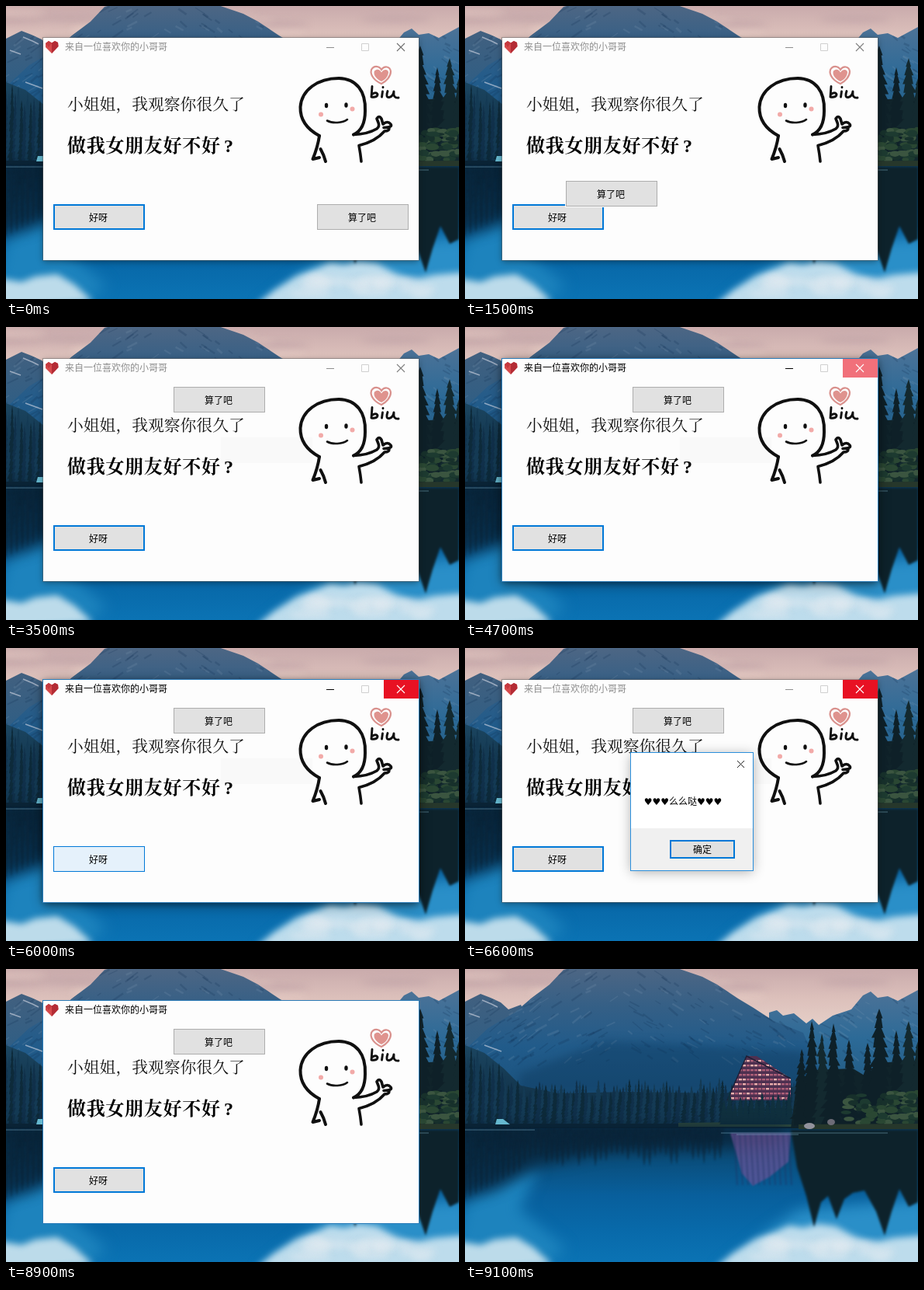
These frames come from a looping animation (584 by 377 pixels, 9.6 s). An HTML page with a canvas:

```html
<!DOCTYPE html>
<html lang="zh-CN">
<head>
<meta charset="utf-8">
<title>小窗口</title>
<style>
html, body { margin: 0; width: 100%; height: 100%; overflow: hidden; background: #0b5c9f; }
body { position: relative; font: 12px 'Noto Sans CJK SC', 'Noto Sans CJK', 'Noto Sans', sans-serif; color: #000; }
canvas, div, svg { position: absolute; box-sizing: border-box; }
canvas, svg { left: 0; top: 0; }

/* Every state change is hard; one loop is 9.6 s, so 1% = 96 ms. */
.a { animation: 9.6s step-end infinite; }

#win { left: 0; top: 0; width: 584px; height: 377px; transform-origin: 290px 184px; animation-name: leave; }
.frame { left: 48px; top: 41px; width: 484px; height: 286px; background: #fdfdfd; }
#idle { box-shadow: 0 0 0 1px rgba(90,90,90,.45), 0 2px 8px rgba(0,0,0,.38); animation-name: flat; }
#glow { box-shadow: 0 0 0 1px #2b7cb8, 0 3px 15px rgba(0,0,0,.45); animation-name: glow, flat; }
#ghost { left: 277px; top: 142px; width: 118px; height: 33px; background: #f9f9f9; animation-name: ghost; }
#bar { animation-name: ink; }
#controls { animation-name: controls; }
#red { animation-name: red; }
#x { animation-name: cross; }

.btn { width: 118px; height: 33px; display: flex; align-items: center; justify-content: center;
  padding: 0 2px 1px 0; background: #e1e1e1; border: 1px solid #adadad; outline: 1px solid #fdfdfd; }
#yes { left: 61px; top: 255px; border: 0; box-shadow: inset 0 0 0 2px #0078d7; animation-name: yes; }
#no { left: 0; top: 0; animation-name: dodge; }

#box { left: 214px; top: 135px; width: 157px; height: 151px; background: #fff; opacity: 0;
  box-shadow: 0 0 0 1px #2b8fdc, 0 2px 15px rgba(0,0,0,.32); animation-name: box; }
#foot { left: 0; bottom: 0; width: 157px; height: 54px; background: #f0f0f0; }
#ok { left: 50px; top: 112px; width: 84px; height: 24px; padding: 0; border: 0; outline: 0; box-shadow: inset 0 0 0 2px #0078d7; }
#lit { left: 0; top: 0; width: 84px; height: 24px; background: #e5f1fb; box-shadow: inset 0 0 0 1px #0078d7; animation-name: lit; }
#okText { left: 0; top: 0; width: 84px; line-height: 23px; text-align: center; }
#msg { left: 0; top: 52px; width: 134px; line-height: 20px; text-align: center; white-space: nowrap; }
#msg span { font: 12px 'DejaVu Sans', sans-serif; }

.line { font: 20.8px 'Noto Serif CJK SC', 'Noto Sans CJK SC', 'Noto Sans CJK', serif; font-weight: 300; }
.ask { font: bold 24px 'Noto Serif CJK SC', 'Noto Sans CJK SC', 'Noto Sans CJK', serif; letter-spacing: .7px; }

@keyframes dodge {
  0% { transform: translate(401px,255px); }
  7.291% { transform: translate(159px,250px); }
  11.458% { transform: translate(371px,215px); }
  15.625% { transform: translate(130px,225px); }
  18.75% { transform: translate(277px,142px); }
  22.916% { transform: translate(136px,189px); }
  27.083% { transform: translate(181px,77px); }
  32.291% { transform: translate(247px,83px); background: #e1e1e1; border-color: #adadad; }
  34.375% { transform: translate(216px,77px); background: #e5f1fb; border-color: #0078d7; }
  36.458%, 100% { transform: translate(216px,77px); background: #e1e1e1; border-color: #adadad; }
}
@keyframes ghost { 0% { opacity: 0; } 22.916% { opacity: 1; } 91.666%, 100% { opacity: 0; } }
@keyframes flat { 92.708%, 100% { box-shadow: 0 0 0 1px #2b7cb8; } }
@keyframes glow {
  0% { opacity: 0; }
  42.708% { opacity: 0; animation-timing-function: steps(5, start); }
  47.916% { opacity: 1; }
  64.583% { opacity: 1; animation-timing-function: steps(5, start); }
  69.791% { opacity: 0; }
  80.208% { opacity: .7; }
  81.25%, 100% { opacity: 1; }
}
@keyframes ink {
  0% { color: #8e8e8e; }
  42.708% { color: #000; }
  64.583% { color: #8e8e8e; }
  80.208%, 100% { color: #000; }
}
@keyframes controls { 0% { opacity: 1; } 91.666%, 100% { opacity: 0; } }
@keyframes red {
  0% { opacity: 0; fill: #e81123; }
  42.708% { opacity: .4; }
  43.75% { opacity: .8; }
  44.791% { opacity: 1; fill: #e81123; }
  48.958% { fill: #f1707a; }
  51.041% { fill: #e81123; }
  53.125% { fill: #f1707a; }
  54.166% { fill: #e81123; }
  56.25% { fill: #f1707a; }
  58.333%, 100% { opacity: 1; fill: #e81123; }
}
@keyframes cross {
  0% { stroke: #6f6f6f; }
  2.083% { stroke: #777; }
  3.125% { stroke: #7f7f7f; }
  42.708%, 100% { stroke: #fff; }
}
@keyframes yes {
  0% { background: #e1e1e1; box-shadow: inset 0 0 0 2px #0078d7; }
  62.5% { background: #e5f1fb; box-shadow: inset 0 0 0 1px #0078d7; }
  64.583%, 100% { background: #e1e1e1; box-shadow: inset 0 0 0 2px #0078d7; }
}
@keyframes box {
  0% { opacity: 0; transform: scale(.9); }
  64.583% { opacity: .25; transform: scale(.93); }
  65.625% { opacity: .65; transform: scale(.97); }
  66.666% { opacity: .88; transform: scale(.99); }
  67.708% { opacity: .97; transform: none; }
  68.75% { opacity: 1; transform: none; }
  80.208% { opacity: .45; transform: scale(.97); }
  81.25%, 100% { opacity: 0; transform: scale(.9); }
}
@keyframes lit {
  0% { opacity: 0; }
  70.833% { opacity: .35; }
  71.875% { opacity: .7; }
  72.916%, 100% { opacity: 1; }
}
@keyframes leave {
  0% { opacity: 1; transform: none; }
  93.75% { opacity: .4; transform: scale(.95); }
  94.791%, 100% { opacity: 0; transform: scale(.9); }
}
</style>
</head>
<body>
<canvas id="lake" width="584" height="377"></canvas>

<div id="win" class="a">
  <div id="idle" class="frame a"></div>
  <div id="glow" class="frame a"></div>
  <div id="ghost" class="a"></div>

  <svg width="584" height="377" fill="none">
    <g id="bar" class="a">
      <path d="M59 61L51 53 51 48 55 45 59 47.500 63 45 67 47 67.500 52Z" fill="#d64a4c"/>
      <path d="M59 47.500L63 45 67 47 67.500 52 59 61Z" fill="#b42c35"/>
      <path d="M59 47.500L55 45 51 48 55 53Z" fill="#c53a40"/>
      <text x="76" y="57.3" fill="currentColor">来自一位喜欢你的小哥哥</text>
      <g id="controls" class="a">
        <path d="M413 53.5h10" stroke="currentColor"/>
        <path d="M458.5 48.5h9v9h-9z" stroke="#d0d0d0"/>
        <path id="red" class="a" d="M487 41h45v24h-45z"/>
        <path id="x" class="a" d="M504 48l10 10m0-10l-10 10" stroke-width="1.1"/>
      </g>
    </g>

    <text class="line" x="79" y="134.3" fill="#111">小姐姐，我观察你很久了</text>
    <text class="ask" y="188" fill="#000"><tspan x="79">做我女朋友好不好</tspan><tspan x="281" font-family="Liberation Serif, serif">?</tspan></text>

    <g stroke="#101010" stroke-width="4" stroke-linecap="round" stroke-linejoin="round">
      <path d="M404 167C389 159 379 148 379.500 130C381 108 402 93 429 93C452 93.500 464 110 463 135C463 151 458 161 448 165.500"/>
      <path d="M404 167Q402 181 395.500 197L404 195M405.500 184Q410 192 412 200"/>
      <path d="M448 165.500Q466 165 478 158Q482 155 480 150L478 145Q481 140 484 145L486 152Q492 147 496 152Q499 156 487 156.500M494 157Q494 161 488 161Q477 174 455 179.500Q457 190 458 200" stroke-width="3.600"/>
      <path d="M414 147.500C421 151.500 434 150.500 440 146" stroke-width="2.600"/>
      <path d="M472 103.500L471 117Q479 118 479 113.500Q477 110 472 113.500M485.500 110L484.500 117M486 104.500v.2M492 109.500Q489 118 494 117.500Q499 116.500 500 110Q499 119 506 118" stroke-width="2.900"/>
    </g>
    <ellipse cx="413" cy="128" rx="2.200" ry="3.300" fill="#101010"/>
    <ellipse cx="438.500" cy="127.500" rx="2.200" ry="3.300" fill="#101010"/>
    <g fill="#f2aaa8"><circle cx="406" cy="139.500" r="3"/><circle cx="446.500" cy="132.500" r="3"/></g>
    <path d="M484 100C475 96 469 89 471 82C474 76 481 77 484 82C488 76 495 78 496 84C496 91 490 97 484 100Z" stroke="#d9918d" stroke-width="2.200"/>
    <path d="M484 97C477 94 473 88 475 83.500C479 80 482 82 484 85.500C487 81 492 81 493 85C493 90 489 95 484 97Z" fill="#df938e"/>
  </svg>

  <div id="yes" class="btn a">好呀</div>
  <div id="no" class="btn a">算了吧</div>
</div>

<div id="box" class="a">
  <svg width="157" height="30" fill="none" stroke="#222"><path d="M137 10l9 9m0-9l-9 9"/></svg>
  <div id="msg"><span>♥♥♥</span>么么哒<span>♥♥♥</span></div>
  <div id="foot"></div>
  <div id="ok" class="btn"><div id="lit" class="a"></div><div id="okText">确定</div></div>
</div>

<script>
const c = document.getElementById('lake').getContext('2d');
let seed = 11;
const rnd = (a = 0, b = 1) => {
  seed = (seed * 16807) % 2147483647;
  return a + (b - a) * seed / 2147483647;
};
const fade = (y0, y1, ...colors) => {
  const g = c.createLinearGradient(0, y0, 0, y1);
  colors.forEach((k, i) => g.addColorStop(i / (colors.length - 1), k));
  return g;
};
const poly = (pts, fill) => {
  const p = new Path2D('M' + pts + 'Z');
  c.fillStyle = fill;
  c.fill(p);
  return p;
};
const blob = (x, y, rx, ry, fill) => {
  c.fillStyle = fill;
  c.beginPath();
  c.ellipse(x, y, rx, ry, 0, 0, 7);
  c.fill();
};
// A negative height draws the tree's reflection.
const tree = (x, base, h, w, fill) => {
  const n = 12, left = [], right = [];
  for (let i = 1; i <= n; i++) {
    const y = base - h * (1 - i / n), r = w * (i / n) ** .7;
    const a = r * rnd(.65, 1.2), b = r * rnd(.65, 1.2);
    left.push([x - a, y], [x - a * .6, y]);
    right.unshift([x + b * .6, y], [x + b, y]);
  }
  poly([[x, base - h], ...left, ...right].join('L'), fill);
};
const rocks = (shape, n, x0, x1, y0, y1) => {
  c.save();
  c.clip(shape);
  c.filter = 'blur(.6px)';
  for (let i = 0; i < n; i++) {
    const x = rnd(x0, x1), y = rnd(y0, y1), l = rnd(4, 15);
    c.strokeStyle = i % 3 ? 'rgba(15,45,80,.2)' : 'rgba(140,165,190,.17)';
    c.lineWidth = rnd(1, 3);
    c.beginPath();
    c.moveTo(x, y);
    c.lineTo(x + (x < 200 ? -l : l), y + l * rnd(.4, .9));
    c.stroke();
  }
  c.restore();
};

// Sky
c.fillStyle = fade(0, 75, '#c9abac', '#dcc0bb', '#e6d0c8');
c.fillRect(0, 0, 584, 210);
c.filter = 'blur(5px)';
for (let i = 0; i < 14; i++) blob(rnd(0, 584), rnd(0, 42), 45, 4, i % 2 ? 'rgba(240,215,205,.4)' : 'rgba(165,135,148,.3)');
c.filter = 'none';

// Mountains
const west = poly('0 42L20 32 33 37 46 43 56 52 72 46 110 130 0 130', fade(30, 130, '#42607f', '#285d86'));
const east = poly('392 56L402 53 410 60 424 57 440 70 448 64 456 72 474 60 498 52 513 34 523 29 532 37 545 35 558 41 584 27 584 206 392 206', fade(30, 150, '#4b7297', '#2c6a97', '#225b83'));
const peak = poly('0 104L30 76 64 56 85 38 109 20 127 1 145 -4 265 -4 306 10 325 20 352 38 372 50 398 67 436 82 470 160 0 160', fade(0, 150, '#4d6684', '#345f86', '#215b8a', '#1c5480'));
rocks(west, 35, 0, 80, 30, 100);
rocks(east, 70, 392, 584, 35, 110);
rocks(peak, 220, 0, 420, 0, 120);
c.filter = 'blur(6px)';
poly('70 135L180 92 300 98 440 106 440 165 70 165', 'rgba(10,50,85,.35)');
c.filter = 'none';
c.strokeStyle = 'rgba(215,218,230,.6)';
c.lineWidth = 1.5;
c.stroke(new Path2D('M22 40l12 5 8 4M5 57l14 5M25 98l22 8'));

// Far shore
poly('0 98L25 108 50 128 72 150 120 160 210 158 330 160 440 150 440 206 0 206', fade(98, 206, '#1b4560', '#14374f', '#0c2638'));
for (let i = 0; i < 110; i++) {
  const x = i * 4, top = x < 75 ? 101 + x * .65 : 154 - x * .02;
  tree(x, 204, 204 - top + rnd(-12, 9), rnd(5, 8), ['#10304a', '#143a54', '#0d2a3a'][i % 3]);
}
poly('0 199L584 199 584 207 0 207', '#0c2536');
poly('275 198L440 196 440 203 275 203', '#304a3c');

// Lodge
const lodge = poly('363 112L376 112 420 141 420 169 338 169', '#4e3050');
c.save();
c.clip(lodge);
for (let y = 117; y < 169; y += 6) {
  for (let x = 338; x < 421; x += 5) {
    c.fillStyle = rnd() < .3 ? '#eeb0ad' : '#ad5f78';
    c.fillRect(x, y, 4, 2.4);
  }
}
c.restore();
c.strokeStyle = '#1e1e35';
c.stroke(new Path2D('M338 169L363 112L420 141'));
for (let x = 334; x < 424; x += 7) tree(x, 200, rnd(25, 45), 7, '#10303e');

// Lake
c.fillStyle = fade(205, 377, '#0b3a5c', '#0a4f7e', '#085f9c', '#0869a9', '#0b73b4');
c.fillRect(0, 205, 584, 172);
c.filter = 'blur(9px)';
poly('0 300L95 255 70 310 130 360 90 390 -20 390', '#1d83bd');
poly('430 310L600 295 600 390 325 390 390 338', '#2a8fc8');
poly('0 200L420 200 400 226 300 232 180 236 90 255 40 283 -20 300', 'rgba(9,34,54,.75)');
c.filter = 'blur(4px)';
poly('-10 350L20 355 38 348 66 345 88 358 112 380 -10 390', '#bcdbea');
poly('322 385L345 366 375 347 400 338 418 330 436 333 455 328 478 331 500 343 525 352 552 346 600 342 600 390', '#bddcec');
for (let i = 0; i < 14; i++) blob(rnd(390, 560), rnd(350, 372), rnd(10, 28), rnd(4, 9), 'rgba(228,236,242,.5)');
c.filter = 'blur(1px)';
for (let x = 0; x < 335; x += 7) tree(x, 205, -(x < 75 ? 94 - x * .55 : rnd(30, 50)), 6, 'rgba(9,32,50,.5)');
poly('342 211L420 211 417 248 392 268 371 279 357 263', 'rgba(115,85,155,.65)');
c.strokeStyle = 'rgba(30,50,100,.45)';
c.lineWidth = 2;
for (let x = 347; x < 420; x += 7) c.stroke(new Path2D(`M${x} 212L${x + 4} 278`));
c.filter = 'blur(1.5px)';
poly('420 207L584 207 584 300 572 306 560 283 550 312 541 343 530 312 515 285 500 288 489 296 479 322 468 292 459 300 450 332 440 292 428 255', '#0d222b');
c.filter = 'none';

// Near trees
poly('420 205L428 145 450 130 500 128 520 140 545 120 584 118 584 205', '#10232a');
for (const [x, h, w] of [[434, 98, 14], [447, 134, 16], [460, 118, 15], [475, 131, 17], [495, 110, 15],
  [519, 106, 16], [534, 150, 23], [556, 122, 17], [572, 134, 19], [584, 108, 18]]) tree(x, 201, h, w, rnd() < .5 ? '#0e2028' : '#13292f');
for (let i = 0; i < 90; i++) blob(rnd(488, 584), rnd(160, 198), rnd(3, 9), rnd(2, 5), ['#1d3a30', '#2a4733', '#3b5540', '#17302b'][i % 4]);
poly('430 200L584 199 584 206 430 206', '#26372b');
blob(444, 202, 7, 4, '#92929c');
blob(472, 197, 5, 4, '#6d6c77');
poly('39 200L41 193 49 193 58 200', '#65b8cf');
c.strokeStyle = 'rgba(130,180,205,.5)';
c.lineWidth = 1;
c.stroke(new Path2D('M330 211H545M0 207H90M350 213H430'));
</script>
</body>
</html>
```
